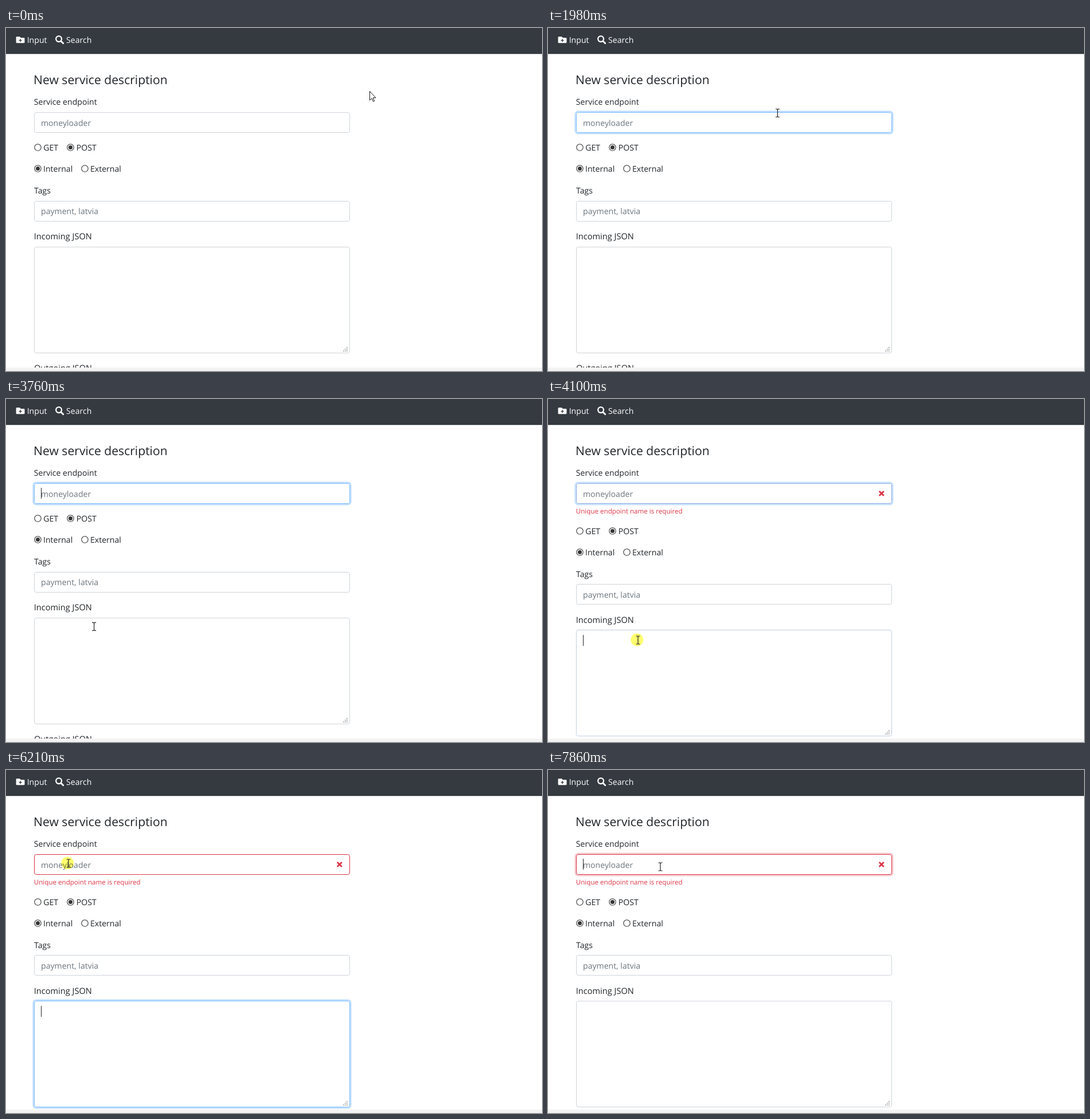
Write an HTML page that moves like this. It is 935x599 px and loops after 8 s.

```html
<!DOCTYPE html>
<html lang="en">
<head>
<meta charset="utf-8">
<title>New service description</title>
<style>
  html, body { margin: 0; width: 100%; height: 100%; overflow: hidden; background: #fff; }
  svg { display: block; width: 935px; height: 599px; }
  text { font: 14.1px "Open Sans", "Noto Sans", sans-serif; fill: #212529; text-rendering: geometricPrecision; }
  .nav text { fill: #fff; }
  .hint { fill: #6c757d; }
  .title { font-size: 21.15px; }
  .wide { font-size: 14.6px; }
  .error { font-size: 11.6px; fill: #dc3545; }
  .click { fill: #ffff70; mix-blend-mode: multiply; }
</style>
</head>
<body>
<svg viewBox="0 0 935 599">
  <defs>
    <g id="radio"><circle r="5.7" fill="#fff" stroke="#343434" stroke-width="1.1"/></g>
    <g id="checked"><use href="#radio"/><circle r="3.5" fill="#343434"/></g>
  </defs>
  <rect width="935" height="599" fill="#fff"/>

  <g class="nav">
    <rect width="935" height="45" fill="#343a40"/>
    <rect y="44" width="935" height="1.3" fill="#292e35"/>
    <path d="M19 15h4.8l2 2h5.3q1.4 0 1.4 1.4v6.5q0 1.4-1.4 1.4H19q-1.4 0-1.4-1.4v-8.500q0-1.400 1.4-1.400z" fill="#fff"/>
    <path d="M22.500 21.600h5.200M25.100 19v5.200" stroke="#343a40" stroke-width="1.400"/>
    <text x="36.700" y="26">Input</text>
    <circle cx="92.100" cy="19.100" r="4.900" fill="none" stroke="#fff" stroke-width="2.300"/>
    <path d="M96 23l3.800 3.800" stroke="#fff" stroke-width="2.800" stroke-linecap="round"/>
    <text x="105" y="26">Search</text>
  </g>

  <text class="title" x="48" y="98">New service description</text>
  <text x="48.800" y="134">Service endpoint</text>
  <g id="fields"></g>
  <text class="hint" x="61" y="170.500">moneyloader</text>
  <g id="invalid">
    <path d="M577.800 161l8 8m0-8l-8 8" stroke="#dc3545" stroke-width="2.700"/>
    <text class="error" x="48.800" y="200">Unique endpoint name is required</text>
  </g>

  <g id="lower">
    <use href="#radio" x="55.500" y="208.500"/>
    <text x="65.200" y="214">GET</text>
    <use href="#checked" x="112.500" y="208.500"/>
    <text x="122.700" y="214">POST</text>
    <use href="#checked" x="55.500" y="245.500"/>
    <text x="65" y="251">Internal</text>
    <use href="#radio" x="137.500" y="245.500"/>
    <text x="147" y="251">External</text>
    <text x="49" y="289">Tags</text>
    <text class="hint" x="61" y="325">payment, latvia</text>
    <text class="wide" x="48.700" y="369">Incoming JSON</text>
    <text class="wide" x="49" y="599">Outgoing JSON</text>
  </g>
  <path id="grip" d="M594 558h1.500M591 561h1.500m1.500 0h1.500M588 564h1.500m1.500 0h1.500m1.500 0h1.500" stroke="#808080" stroke-width="1.500"/>
  <path id="caret" d="M61.500 0v19" stroke="#222" stroke-width="1"/>
  <rect y="593" width="935" height="6" fill="#f3f3f3"/>

  <circle id="click" class="click" r="11"/>
  <path id="arrow" d="M.5.500v15.700l3.500-3.400 2.500 5.600 2.200-1-2.500-5.500h4.800z" fill="#fff" stroke="#111" stroke-width="1"/>
  <path id="beam" d="M-3.500-7h2.500l1 1 1-1h2.500M0-6v12M-3.500 7h2.500l1-1 1 1h2.500" fill="none" stroke="#222" stroke-width="1.200"/>
</svg>
<script>
const LOOP = 8000, STEP = 110.7, LEAD = 17;
const FOCUS_NAME = 1, FOCUS_JSON = 37, REFOCUS_NAME = 57;

// Steps at which the caret flips between shown and hidden
const blinks = [1, 3, 5, 7, 9, 10, 12, 14, 16, 18, 20, 21, 23, 25, 26, 28, 30, 31, 33, 35, 37,
  39, 41, 43, 45, 47, 49, 50, 52, 54, 56, 59, 60, 62, 64, 66, 68, 69, 71];

// Pointer path: step, x, y
const path = [[15, 634, 110], [21, 167, 187], [22, 167, 187], [26, 144, 330], [30, 144, 330],
  [36, 157, 421], [42, 157, 421], [45, 136, 366], [47, 100, 268], [50, 248, 211],
  [55, 109, 163], [58, 109, 163], [60, 196, 169]];

const GRAY = [206, 212, 218], BLUE = [128, 189, 255], RED = [220, 53, 69];
const GLOW_BLUE = [0, 123, 255];

const $ = id => document.getElementById(id);
const show = (el, on) => el.setAttribute('visibility', on ? 'visible' : 'hidden');
const move = (el, x, y) => el.setAttribute('transform', `translate(${x} ${y})`);
const mix = (a, b, k) => a.map((v, i) => v + (b[i] - v) * k);
const rgb = c => `rgb(${c.map(Math.round)})`;

function addRect(attrs) {
  const el = document.createElementNS('http://www.w3.org/2000/svg', 'rect');
  for (const key in attrs) el.setAttribute(key, attrs[key]);
  return $('fields').appendChild(el);
}

function makeField(y, h) {
  const glow = addRect({ x: 47.7, width: 553.6, height: h + 2.6, rx: 5, fill: 'none', 'stroke-width': 2.6 });
  const box = addRect({ x: 49.5, width: 550, height: h - 1, rx: 3.3, fill: '#fff' });
  return { y, h, glow, box };
}

const nameField = makeField(147, 36);
const tagsField = makeField(302, 36);
const jsonField = makeField(382, 186);
const fields = [nameField, tagsField, jsonField];

function paint(field, top, border, glow, strength) {
  field.top = top;
  field.box.setAttribute('y', top + 0.5);
  field.box.setAttribute('stroke', rgb(border));
  field.glow.setAttribute('y', top - 1.3);
  field.glow.setAttribute('stroke', rgb(glow));
  field.glow.setAttribute('stroke-opacity', 0.25 * strength);
}

// A focus change needs one step to settle
const settle = (n, from) => n < from ? 0 : n === from ? 0.15 : 1;

function pointerAt(n) {
  const i = path.findIndex(p => p[0] >= n);
  if (i < 0) return path[path.length - 1].slice(1);
  if (i === 0) return path[0].slice(1);
  const a = path[i - 1], b = path[i];
  const k = (n - a[0]) / (b[0] - a[0]);
  return mix(a, b, k * k * (3 - 2 * k)).slice(1);
}

function render(t) {
  const n = Math.floor((t + LEAD) / STEP);
  const first = settle(n, FOCUS_NAME), json = settle(n, FOCUS_JSON), again = settle(n, REFOCUS_NAME);
  const invalid = n >= FOCUS_JSON;
  const drop = invalid ? 21 : 0;

  const nameBorder = mix(mix(GRAY, BLUE, first), RED, json);
  paint(nameField, nameField.y, nameBorder, again ? RED : GLOW_BLUE, again || first - json);
  paint(tagsField, tagsField.y + drop, GRAY, GLOW_BLUE, 0);
  const jsonFocus = json - again;
  paint(jsonField, jsonField.y + drop, mix(GRAY, BLUE, jsonFocus), GLOW_BLUE, json === 0.15 ? 0.05 : jsonFocus);

  show($('invalid'), invalid);
  move($('lower'), 0, invalid ? 22 : 0);
  move($('grip'), 0, drop);

  const inJson = invalid && n < REFOCUS_NAME;
  show($('caret'), blinks.filter(b => b <= n).length % 2);
  move($('caret'), 0, inJson ? 412 : 155);

  const [x, y] = pointerAt(n);
  const overField = x > 49 && x < 600 && fields.some(f => y >= f.top && y < f.top + f.h);
  show($('beam'), overField);
  show($('arrow'), !overField);
  move($('beam'), x, y);
  move($('arrow'), x, y);
  show($('click'), (n >= 36 && n < 38) || (n >= 56 && n < 58));
  move($('click'), x - 1.7, y - 0.5);
}

const start = performance.now();
function tick() {
  render((performance.now() - start) % LOOP);
  requestAnimationFrame(tick);
}
tick();
</script>
</body>
</html>
```
